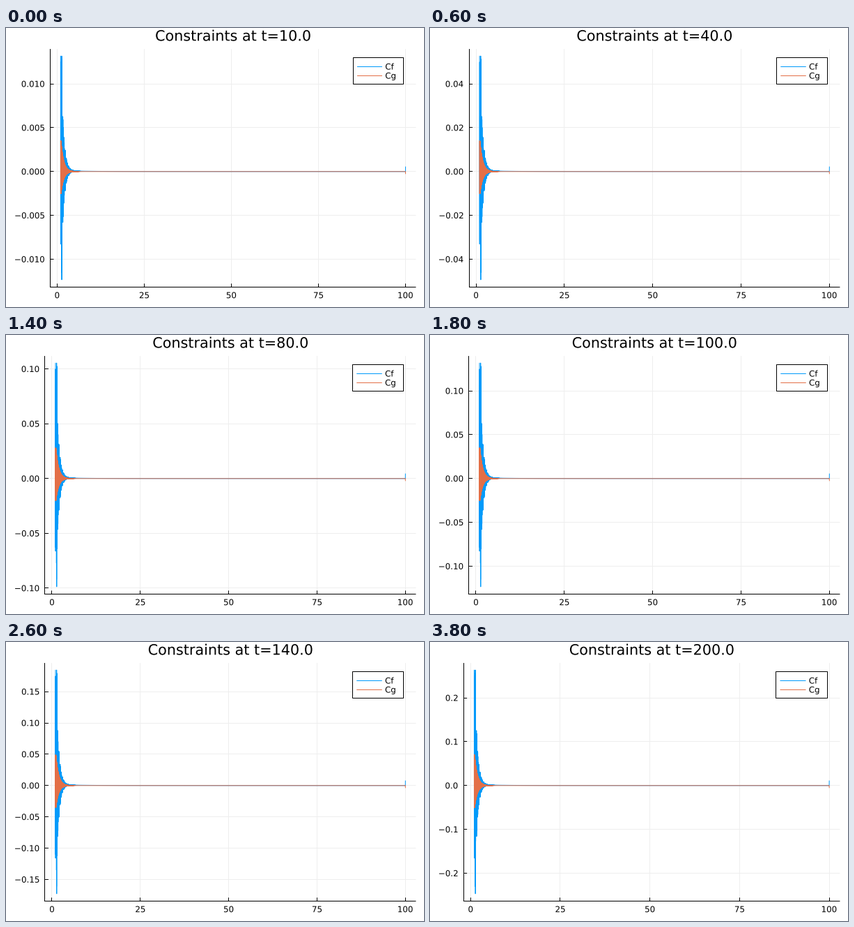
These frames come from a looping animation (600 by 400 pixels, 4000 ms). A matplotlib script:

```python
import numpy as np
import matplotlib.pyplot as plt
from matplotlib.animation import FuncAnimation
from matplotlib.patches import PathPatch, Rectangle
from matplotlib.path import Path
from matplotlib.textpath import TextPath

plt.rcParams["path.simplify"] = False

W, H, DPI = 600, 400, 100
PX = 72 / DPI
BLUE, ORANGE, GRID = "#009AFA", "#E36F47", "#EEEEEE"
SMALL, LARGE = 11.85, 20.74
RIGHT, ZERO_Y, UNIT = 588.4, 205.8, 12.57
LO, HI = -13.18, 13.98            # axis limits in units that grow with t
X_LO, X_HI = -1.97, 102.97
TOP, BOTTOM = ZERO_Y - HI * UNIT, ZERO_Y - LO * UNIT
NICE = [(1, 1.0), (5, 0.9), (2, 0.7), (2.5, 0.5), (3, 0.2)]


def zigzag(top, low):
    """Grid-scale oscillation between two envelopes."""
    return np.where(np.arange(len(top)) % 2 == 0, top, low)


# Error bursts that decay away from the inner edge, with a beat in Cf.
x = np.linspace(1, 100, 4951)
d = x - 1
beat = 0.8 + 0.2 * np.cos(2 * np.pi * d / 0.33)
burst = beat * np.where(d < 0.36, 13.2, 16 * np.exp(-1.45 * d))
tail = 0.1 * (1 - np.exp(-d)) * np.exp(-d / 8)
cf = tail + zigzag(burst, -0.95 * burst * np.minimum(1, 0.65 + d))
ripple = np.minimum(3.5, 4.2 * np.exp(-1.3 * d))
cg = zigzag(ripple, -0.72 * ripple)
cf[-1], cg[-1] = 0.57, -0.28      # boundary jump at the outer edge

fig = plt.figure(figsize=(W / DPI, H / DPI), dpi=DPI, facecolor="white")
ax = fig.add_axes([0, 0, 1, 1])


def pick_step(lo, hi):
    """Best tick step: balances tick count, coverage and round numbers."""
    best = (-1, None)
    for e in (-3, -2, -1):
        for q, nice in NICE:
            step = q * 10.0 ** e
            n = int(np.floor(hi / step) - np.ceil(lo / step)) + 1
            if 4 <= n <= 8:
                score = ((1 - abs(n - 5) / 5) / 4
                         + (hi - lo) / ((n - 1) * step) / 2 + nice / 4)
                best = max(best, (score, step))
    return best[1]


def y_ticks(scale):
    lo, hi = LO * scale, HI * scale
    step = pick_step(lo, hi)
    digits = next(n for n in range(1, 6) if abs(round(step, n) - step) < 1e-9)
    ks = range(int(np.ceil(lo / step)), int(np.floor(hi / step)) + 1)
    return [(ZERO_Y - k * step / scale * UNIT,
             f"{k * step:.{digits}f}".replace("-", "\u2212")) for k in ks]


def ink_width(s, size):
    return TextPath((0, 0), s, size=size).get_extents().width


def text(px, base, s, size, align=0.0):
    """Draw text with its ink box aligned at px (0 left, 0.5 centre, 1 right)."""
    glyphs = TextPath((0, 0), s, size=size)
    box = glyphs.get_extents()
    shift = px - box.x0 - align * box.width
    verts = glyphs.vertices * [1, -1] + [shift, base]
    ax.add_patch(PathPatch(Path(verts, glyphs.codes), fc="black", lw=0, zorder=6))


def crisp(v):
    """Centre of the pixel that holds v."""
    return np.floor(v) + 0.5


def curve(xs, ys, color, z=4):
    ax.plot(xs, ys, color=color, lw=PX, zorder=z, snap=False,
            solid_joinstyle="round", solid_capstyle="butt")


def hline(x0, x1, y, color="black", z=3):
    curve([x0, x1], [crisp(y)] * 2, color, z)


def vline(px, y0, y1, color="black", z=3):
    curve([crisp(px)] * 2, [y0, y1], color, z)


def legend(width):
    right = RIGHT - width / 30
    end = right - 30.9
    start = end - 0.0685 * width
    left = start - 0.0105 * width
    x0, x1, y0, y1 = map(crisp, (left, right, 42, 80.8))
    ax.add_patch(Rectangle((x0, y0), x1 - x0, y1 - y0, fc="white", ec="black",
                           lw=PX, snap=False, zorder=5))
    for y, name, color in ((55.2, "Cf", BLUE), (68.2, "Cg", ORANGE)):
        hline(start, end, y, color, z=6)
        text(end + 4.9, y + 4.35, name, SMALL)


def draw(i):
    t = 10.0 * (i + 1)
    ax.clear()
    ax.set(xlim=(0, W), ylim=(H, 0))
    ax.axis("off")

    ticks = y_ticks(t * 1e-4)
    left = 21.7 + max(ink_width(s, SMALL) for _, s in ticks)
    width = RIGHT - left

    def to_px(v):
        return left + (v - X_LO) * width / (X_HI - X_LO)

    for v in range(0, 101, 25):
        px = to_px(v)
        vline(px, TOP, BOTTOM, GRID, z=1)
        vline(px, BOTTOM - 5, BOTTOM)
        text(px, 387.3, str(v), SMALL, 0.5)
    for y, label in ticks:
        hline(left, RIGHT, y, GRID, z=1)
        hline(left, left + 5, y)
        text(left - 8.6, y + 4.35, label, SMALL, 1)

    vline(left, TOP, crisp(BOTTOM) + 0.5)
    hline(np.floor(left), RIGHT, BOTTOM)
    curve(to_px(x), ZERO_Y - cf * UNIT, BLUE)
    curve(to_px(x), ZERO_Y - cg * UNIT, ORANGE)
    legend(width)
    text((left + RIGHT) / 2, 18.3, f"Constraints at t={t:.1f}", LARGE, 0.5)
    return []


anim = FuncAnimation(fig, draw, frames=20, init_func=lambda: draw(0),
                     interval=200, repeat=True, repeat_delay=0, blit=False)
plt.show()
```
